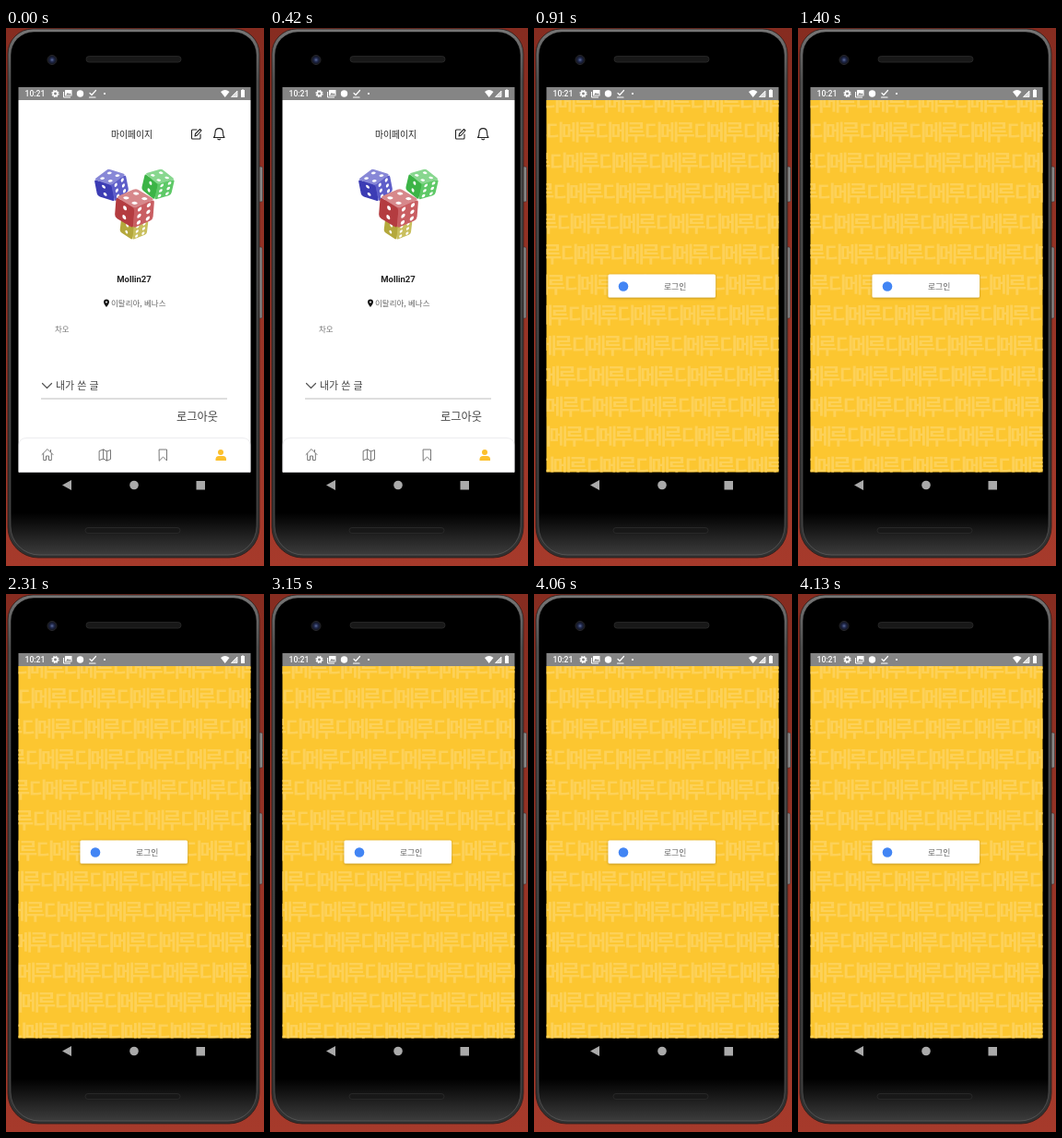
Animation, 280 px wide and 582 px high, one loop 4340 ms. Source, as an HTML page:

```html
<!DOCTYPE html>
<html lang="ko">
<head>
<meta charset="utf-8">
<title>Log out</title>
<style>
html, body { margin: 0; width: 100%; height: 100%; overflow: hidden; background: #9f3626; }
svg { display: block; width: 280px; height: 582px; }
text { font-family: "Noto Sans CJK KR", "Noto Sans CJK", Roboto, sans-serif; }
.latin { font-family: Roboto, "Open Sans", sans-serif; }
.line { fill: none; stroke-linecap: round; stroke-linejoin: round; }
</style>
</head>
<body>
<svg viewBox="0 0 280 582">
  <defs>
    <linearGradient id="desk" x2="0" y2="1">
      <stop stop-color="#862c20"/>
      <stop offset="1" stop-color="#a63a2b"/>
    </linearGradient>
    <linearGradient id="rim" x2="0" y2="1">
      <stop stop-color="#777"/>
      <stop offset=".1" stop-color="#4a4a4a"/>
      <stop offset="1" stop-color="#303030"/>
    </linearGradient>
    <linearGradient id="glass" x2="0" y2="1">
      <stop offset=".92" stop-color="#000"/>
      <stop offset="1" stop-color="#3c3c3c"/>
    </linearGradient>
    <radialGradient id="lens">
      <stop stop-color="#5a6a9c"/>
      <stop offset=".45" stop-color="#20284a"/>
      <stop offset="1" stop-color="#101116"/>
    </radialGradient>
    <filter id="soft" x="-10%" y="-30%" width="120%" height="170%">
      <feDropShadow dx="0" dy=".7" stdDeviation=".8" flood-color="#543800" flood-opacity=".45"/>
    </filter>
    <clipPath id="screen"><path d="M13.500 78H265.500V480.500H13.500Z"/></clipPath>
  </defs>

  <!-- phone -->
  <rect width="280" height="582" fill="url(#desk)"/>
  <g fill="#858585" stroke="#3c3434" stroke-width=".6">
    <rect x="273" y="150" width="5.500" height="38" rx="1.500"/>
    <rect x="273" y="237" width="5" height="77" rx="1.500"/>
  </g>
  <path d="M2 28A27 27 0 0 1 29 1H248A27 27 0 0 1 275 28V540A33 33 0 0 1 242 573H35A33 33 0 0 1 2 540Z" fill="url(#rim)" stroke="#2a1c1a" stroke-width=".8"/>
  <path d="M5 29A25 25 0 0 1 30 4H247A25 25 0 0 1 272 29V539A31 31 0 0 1 241 570H36A31 31 0 0 1 5 539Z" fill="url(#glass)" stroke="#777" stroke-opacity=".55" stroke-width=".8"/>
  <g fill="#181818" stroke="#2c2c2c" stroke-width=".8">
    <rect x="87" y="30.500" width="103" height="6.500" rx="3.200"/>
    <rect x="86" y="540.500" width="103" height="6" rx="3"/>
  </g>
  <circle cx="50" cy="34.500" r="5" fill="url(#lens)" stroke="#26262a"/>
  <g fill="#aaa">
    <path d="M61 494.500L71 489V500Z"/>
    <circle cx="139" cy="494.500" r="4.800"/>
    <rect x="206.500" y="490" width="9.500" height="9.500"/>
  </g>

  <!-- profile page -->
  <g id="profile" clip-path="url(#screen)">
    <path d="M13 78H266V481H13Z" fill="#fff"/>
    <text x="136.500" y="118.500" font-size="9.800" font-weight="500" text-anchor="middle" fill="#222">마이페이지</text>
    <g class="line" stroke="#222" stroke-width="1.100">
      <path d="M207 110H202.500Q201.500 110 201.500 111V119Q201.500 120 202.500 120H210Q211 120 211 119V115M205 117L205.500 114.500 210.500 109.500 212 111 207.500 116Z"/>
      <path d="M225.500 118.500H237C235.500 117 235.500 116 235.500 113.500C235.500 107 227 107 227 113.500C227 116 227 117 225.500 118.500ZM229.800 120.200Q231.200 121.500 232.700 120.200"/>
    </g>
    <g id="dice"></g>
    <text class="latin" x="139" y="275" font-size="9.500" font-weight="700" text-anchor="middle" fill="#222">Mollin27</text>
    <path d="M109 302Q106 298 106 296.500A3 3 0 0 1 112 296.500Q112 298 109 302Z" fill="#111"/>
    <circle cx="109" cy="296.500" r="1" fill="#fff"/>
    <text x="114" y="301" font-size="8.500" fill="#666">이탈리아, 베나스</text>
    <text x="53" y="329" font-size="8.500" fill="#777">차오</text>
    <path class="line" d="M39.500 384.500L44.500 389.500 49.500 384.500" stroke="#555" stroke-width="1.200"/>
    <text x="54" y="391" font-size="11" fill="#444">내가 쓴 글</text>
    <path d="M38 401H240" stroke="#bdbdbd"/>
    <text id="logout" x="185" y="425.300" font-size="12.200" fill="#444">로그아웃</text>
    <path d="M14 481V451Q14 443.500 23 443.500H256Q265 443.500 265 451V481Z" fill="#fff" stroke="#ececef"/>
    <g class="line" stroke="#777">
      <path d="M39 461.500L45 455.500 51 461.500M40.700 460.500V467.500H43.500V463H46.500V467.500H49.300V460.500M48.500 456.500V458.500"/>
      <path d="M101.500 457.500L105.500 456 109.500 458 113.500 456.500V466.500L109.500 468 105.500 466 101.500 467.500ZM105.500 456V466M109.500 458V468"/>
      <path d="M166.500 456H174.500V468L170.500 464 166.500 468Z"/>
    </g>
    <g fill="#fcc02c">
      <circle cx="233" cy="459" r="3"/>
      <path d="M227.500 468V466.500Q227.500 463 231 463H235.500Q239 463 239 466.500V468Z"/>
    </g>
  </g>

  <!-- login page -->
  <g id="login" clip-path="url(#screen)">
    <path d="M13 78H266V481H13Z" fill="#fcc630"/>
    <g id="words" fill="#fdd158" font-size="22.500" font-weight="900" letter-spacing="-3.500"></g>
    <rect x="80.500" y="266.500" width="116.500" height="25" rx="1.500" fill="#fff" filter="url(#soft)"/>
    <circle cx="97" cy="279.500" r="5.300" fill="#4285f4"/>
    <text x="141" y="282.500" font-size="8.800" fill="#666">로그인</text>
  </g>

  <!-- status bar -->
  <path d="M13.500 64H265.500V78H13.500Z" fill="#858585"/>
  <text class="latin" x="20.500" y="74.300" font-size="8.600" font-weight="500" fill="#fff">10:21</text>
  <circle cx="53.500" cy="71" r="2.300" fill="none" stroke="#fff" stroke-width="1.700"/>
  <circle cx="53.500" cy="71" r="3.500" fill="none" stroke="#fff" stroke-width="1.200" stroke-dasharray="1.500 1.250"/>
  <path d="M62.500 69V75H70" fill="none" stroke="#fff"/>
  <rect x="64" y="67" width="7.500" height="6.500" rx=".5" fill="#fff"/>
  <path d="M65 72.500L67 70 68.500 71.500 69.500 70.500 71 72.500Z" fill="#858585"/>
  <circle cx="80.500" cy="71" r="3.700" fill="#fff"/>
  <path class="line" d="M91 70.500L93 72.500 97.500 67.500M90.500 75H97" stroke="#fff" stroke-width="1.200"/>
  <circle cx="107" cy="71" r="1.100" fill="#fff"/>
  <g fill="#fff">
    <path d="M233 69Q237.700 65 242.500 69L237.700 75Z"/>
    <path d="M255 67H256V66.500H258V67H259V75H255Z"/>
  </g>
  <path d="M244.500 74.500L251 68V74.500Z" fill="#ddd" stroke="#fff" stroke-width=".8"/>
</svg>
<script>
const LOOP = 4340, PRESS = 770, LOGIN = 910;
const $ = id => document.getElementById(id);

// Pips in two columns on a unit square.
function pips(n) {
  const rows = n / 2;
  return Array.from({ length: n }, (_, i) =>
    `<circle cx="${i % 2 ? .73 : .27}" cy="${((i >> 1) + .5) / rows}" r=".1" fill="#fff"/>`).join('');
}

// Three faces around the corner (x, y), each a unit square mapped onto two edges.
function die(x, y, size, turn, hue) {
  const edge = k => {
    const a = (turn + k * 120) * Math.PI / 180;
    return [size * Math.cos(a), size * .9 * Math.sin(a)];
  };
  const color = light => `hsl(${hue} 50% ${light}%)`;
  const faces = [2, 4, 6].map((n, k) =>
    `<g transform="matrix(${[...edge(k), ...edge(k + 1), x, y]})">
      <rect width="1" height="1" rx=".14" fill="${color([47, 69, 58][k])}"/>${pips(n)}</g>`);
  return `<circle cx="${x}" cy="${y}" r="${size * .7}" fill="${color(58)}"/>` + faces.join('');
}

$('dice').innerHTML =
  die(139, 214, 17, 96, 54) +
  die(165, 169, 19, 102, 125) +
  die(114.5, 170, 20, 80, 240) +
  die(139.5, 195, 24, 94, 358);

// Staggered rows of the repeated word.
let rows = '';
for (let r = 0; r < 13; r++)
  for (let x = -45 + r * 4; x < 266; x += 53.5)
    rows += `<text x="${x}" y="${88.5 + r * 32.9}">디메루</text>`;
$('words').innerHTML = rows;

function draw() {
  const t = performance.now() % LOOP, login = t >= LOGIN;
  $('profile').style.display = login ? 'none' : '';
  $('login').style.display = login ? '' : 'none';
  $('logout').style.opacity = t < PRESS ? 1 : .25;
  requestAnimationFrame(draw);
}
draw();
</script>
</body>
</html>
```
